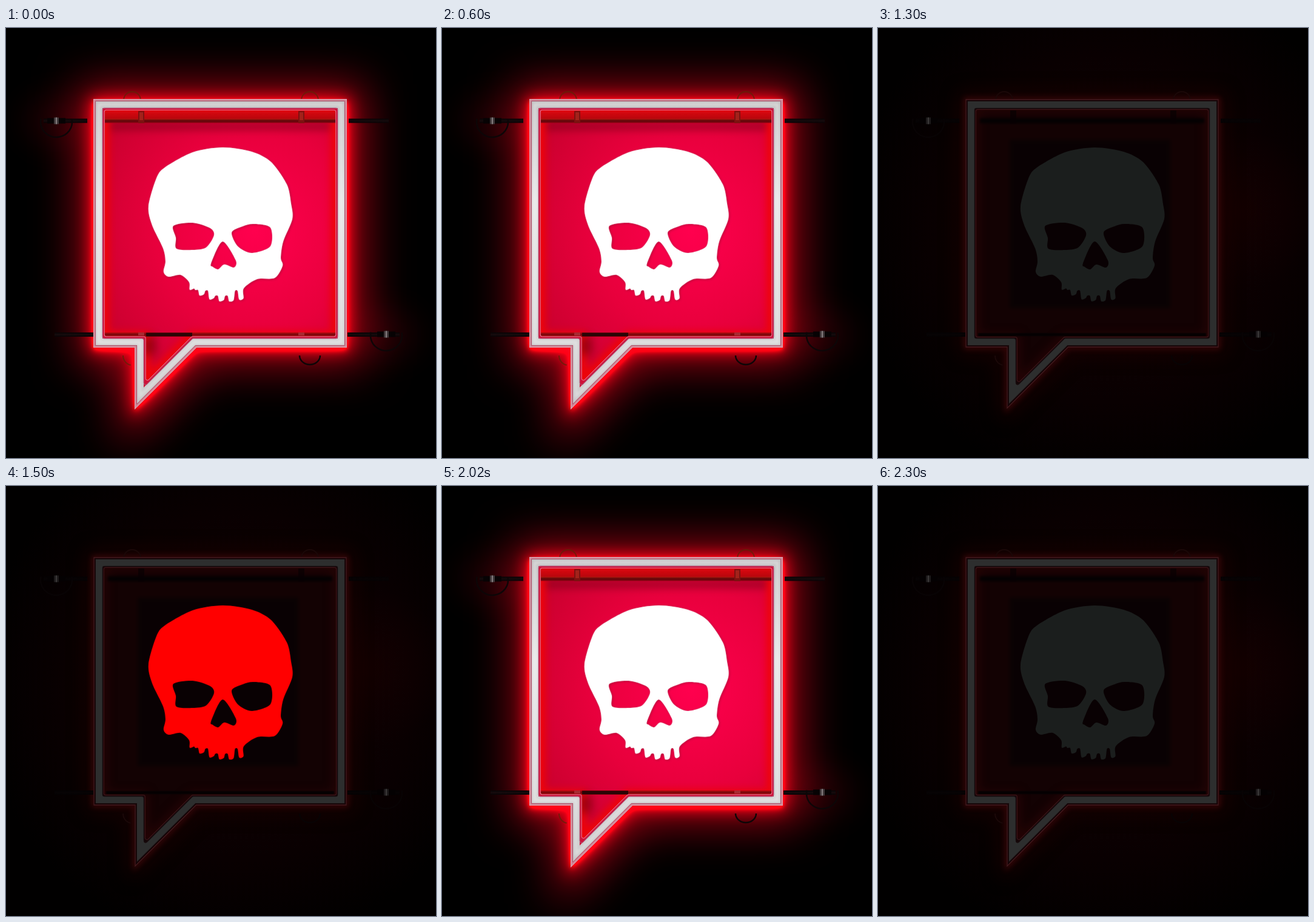
An HTML page with a canvas that plays this animation: 709x709 px, repeating every 2500 ms.

```html
<!DOCTYPE html>
<html lang="en">
<head>
<meta charset="utf-8">
<title>Neon skull sign</title>
<style>
html, body { margin: 0; width: 100%; height: 100%; overflow: hidden; background: #000; }
canvas { display: block; width: 100%; height: 100%; }
</style>
</head>
<body>
<canvas id="stage" width="709" height="709"></canvas>
<script>
const SIZE = 709, FAR = 3000, LOOP = 2500;

// Speech bubble outline, moved inwards by d
function bubble(d, r = 0) {
  const l = 144 + d, t = 117 + d, e = 562 - d, b = 527 - d;
  const x = 212 + d, sum = 841 - d * Math.SQRT2;
  const pts = [[l, t], [e, t], [e, b], [sum - b, b], [x, sum - x], [x, b], [l, b]];
  const p = new Path2D();
  p.moveTo((l + e) / 2, t);
  for (let i = 1; i <= pts.length; i++) {
    const a = pts[i % 7], n = pts[(i + 1) % 7];
    p.arcTo(a[0], a[1], n[0], n[1], r);
  }
  p.closePath();
  return p;
}

function ring(a, b) {
  const p = new Path2D(bubble(a));
  p.addPath(bubble(b, 3));
  return p;
}

// Smooth closed curve through a few points
function addCurve(p, pts) {
  const at = i => pts[(i + pts.length) % pts.length];
  p.moveTo(...at(0));
  pts.forEach((b, i) => {
    const a = at(i - 1), c = at(i + 1), d = at(i + 2);
    p.bezierCurveTo(b[0] + (c[0] - a[0]) / 7, b[1] + (c[1] - a[1]) / 7,
      c[0] - (d[0] - b[0]) / 7, c[1] - (d[1] - b[1]) / 7, c[0], c[1]);
  });
  p.closePath();
}

// Six evenly spaced teeth along a parabola, from right to left
function teeth() {
  const pts = [];
  for (let i = 0; i < 6; i++) {
    const x = 388 - 16.3 * i, y = 451 - ((x - 364) / 13) ** 2;
    const gap = y - (i % 3 ? 9 : 14);
    pts.push([x + 3.5, y - 2], [x - 3.5, y]);
    if (i < 5) pts.push([x - 6, gap], [x - 10.5, gap]);
  }
  return pts;
}

function makeSkull() {
  const right = [[357, 197], [405, 204], [437, 221], [463, 258], [470, 290], [472, 315],
    [457, 352], [453, 379], [456, 392], [443, 412], [414, 414], [392, 429]];
  const left = [[302, 419], [288, 407], [268, 410], [260, 402], [263, 385], [259, 363],
    [241, 325], [235, 294], [248, 248], [262, 230], [308, 205]];
  const leftEye = [[276, 326], [308, 321], [337, 330], [343, 342], [330, 362], [308, 366],
    [281, 364], [280, 346]];
  const rightEye = [[372, 337], [390, 327], [408, 323], [436, 329], [436, 360], [405, 371],
    [382, 360]];
  const nose = [[357, 352], [338, 388], [341, 394], [350, 398], [360, 390], [376, 395],
    [379, 383]];
  const p = new Path2D();
  [[...right, ...teeth(), ...left], leftEye, rightEye, nose].forEach(c => addCurve(p, c));
  return p;
}

// Soft blurred copy of a path; width > 0 blurs its stroke
function soft(g, path, color, sigma, width = 0, dx = 0, dy = 0) {
  g.save();
  g.shadowColor = color;
  g.shadowBlur = sigma * 2;
  g.shadowOffsetX = FAR + dx;
  g.shadowOffsetY = dy;
  g.translate(-FAR, 0);
  g.lineWidth = width;
  g.fillStyle = g.strokeStyle = '#000';
  if (width) g.stroke(path); else g.fill(path, 'evenodd');
  g.restore();
}

function line(g, path, color, width = 1) {
  g.strokeStyle = color;
  g.lineWidth = width;
  g.stroke(path);
}

function fill(g, path, color) {
  g.fillStyle = color;
  g.fill(path, 'evenodd');
}

function box(g, x, y, w, h, color) {
  g.fillStyle = color;
  g.fillRect(x, y, w, h);
}

function rect(x, y, w, h) {
  const p = new Path2D();
  p.rect(x, y, w, h);
  return p;
}

function arc(x, y, rx, ry, from, to) {
  const p = new Path2D();
  p.ellipse(x, y, rx, ry, 0, from * Math.PI, to * Math.PI);
  return p;
}

function ramp(f, colors) {
  colors.forEach((c, i) => f.addColorStop(i / (colors.length - 1), c));
  return f;
}
const radial = (g, x, y, r, ...colors) => ramp(g.createRadialGradient(x, y, 0, x, y, r), colors);
const vertical = (g, y0, y1, ...colors) => ramp(g.createLinearGradient(0, y0, 0, y1), colors);

const plugs = [[83, 153], [627, 505]], hooks = [208, 501], clamps = [218, 482];

// Rods, wires and hooks behind the bubble
function hardware(g, c) {
  const rod = (x, y, w) => box(g, x, y, w, 7, vertical(g, y, y + 7, c.rod, c.rodTop, c.rod));
  rod(62, 149.5, 72);
  rod(565, 149.5, 66);
  rod(80, 502, 67);
  rod(563, 502, 86);
  for (const [x, y] of plugs) {
    line(g, arc(x, y + 2, 26, 25, -.06, 1.07), c.wire, 2.5);
    box(g, x - 15, y - 4.5, 30, 9, c.rod);
    box(g, x - 4, y - 5.5, 8, 11, c.clip);
    box(g, x - 1, y - 5.5, 2, 11, c.clipLight);
  }
  for (const x of hooks) line(g, arc(x, 119, 14, 14, 1, 2), c.hook, 2);
  line(g, arc(208, 540, 15, 16, .55, 1), c.hook, 2);
  line(g, arc(501, 540, 17, 15, 0, 1), c.wire, 2.5);
}

function makeLit() {
  const [cv, g] = layer();
  box(g, 0, 0, SIZE, SIZE, '#000');
  g.globalCompositeOperation = 'lighter';
  soft(g, bubble(-26), 'rgb(150,0,17)', 36, 0, 3, 2);
  soft(g, bubble(-6), 'rgb(150,0,12)', 13, 0, 0, 2);
  soft(g, bubble(0), 'rgb(170,8,4)', 5, 0, 0, 4);
  for (const [x, y] of plugs) soft(g, arc(x, y, 55, 45, 0, 2), 'rgb(22,0,3)', 24);
  g.globalCompositeOperation = 'source-over';
  hardware(g, { rod: '#070304', rodTop: '#160b0d', wire: '#0d0607', clip: '#40383a',
    clipLight: '#857d7f', hook: 'rgba(100,34,8,.8)' });

  g.save();
  g.clip(bubble(14));
  box(g, 144, 117, 418, 520, radial(g, 410, 335, 330, '#ff004e', '#e8003c', '#c0002a'));
  soft(g, rect(165, 156, 380, 12), 'rgba(110,0,18,.55)', 7);
  // Warm light spilling in from the tube
  soft(g, bubble(18), 'rgba(238,4,8,.95)', 6, 18);
  box(g, 160, 132, 388, 18, vertical(g, 132, 150, '#f20a12', '#cf070e', '#b8060d'));
  box(g, 163, 149.5, 382, 7, vertical(g, 149, 157, '#c01a10', '#5c070a', '#8c0410'));
  for (const x of clamps) {
    box(g, x, 137, 10, 20, '#7c1210');
    box(g, x + 2, 139, 6, 13, '#a3221a');
  }
  box(g, 163, 502, 382, 7, vertical(g, 502, 509, '#b80b10', '#74070a', '#c0080e'));
  soft(g, rect(228, 509, 18, 30), 'rgba(90,0,8,.6)', 8);
  box(g, 231, 502.5, 76, 6, '#2a0506');
  for (const x of clamps) box(g, x, 502, 10, 5, '#a82a32');
  g.restore();

  // Glass rim, bright core, then the inner rim
  fill(g, ring(0, 4), '#cf8494');
  fill(g, ring(4, 15), vertical(g, 117, 629, '#c4c3c4', '#e6e5e6', '#dcdbdc', '#c8c7c8'));
  fill(g, ring(15, 18), '#cf1238');
  g.save();
  g.clip(ring(4, 15), 'evenodd');
  soft(g, bubble(9), 'rgba(255,255,255,.35)', 2, 4);
  g.restore();
  line(g, bubble(.6), '#d9a3af', 1.2);
  line(g, bubble(3.6), '#a5546c');
  line(g, bubble(15.2, 3), '#b24a70', 1.2);
  line(g, bubble(18.2, 3), '#e5718f', 1.1);

  soft(g, skull, 'rgba(110,0,26,.55)', 2, 0, 1, 1);
  soft(g, skull, 'rgba(255,220,230,.8)', 1);
  fill(g, skull, '#fff');
  return cv;
}

function makeDark(red) {
  const [cv, g] = layer();
  box(g, 0, 0, SIZE, SIZE, radial(g, 385, 330, 430, '#110103', '#0e0102', '#090001', '#010000'));
  box(g, 0, 0, SIZE, SIZE, radial(g, 600, 300, 130, 'rgba(24,0,0,.6)', 'rgba(24,0,0,0)'));
  soft(g, bubble(0), 'rgba(50,4,6,.55)', 16, 14);
  soft(g, bubble(1), 'rgba(85,12,14,.6)', 5, 7);
  hardware(g, { rod: '#040102', rodTop: '#070304', wire: '#080304', clip: '#1d1a1b',
    clipLight: '#3b3939', hook: '#1b0808' });

  g.save();
  g.clip(bubble(16));
  box(g, 144, 117, 418, 520, '#130203');
  soft(g, bubble(16), 'rgba(48,5,7,.7)', 8, 12);
  soft(g, rect(217, 184, 265, 278), '#090103', 3);
  soft(g, rect(168, 149, 370, 8), '#030001', 2);
  soft(g, rect(165, 503, 376, 5), '#040001', 1);
  for (const x of clamps) box(g, x, 136, 10, 22, 'rgba(8,1,2,.7)');
  g.restore();

  fill(g, ring(0, 18), '#140507');
  fill(g, ring(4, 15), '#2d2e2e');
  line(g, bubble(1), '#47191d', 1.3);
  line(g, bubble(3.4), '#1b0a0c');
  line(g, bubble(15.5, 3), '#170a0c', 1.5);
  line(g, bubble(17.3, 3), '#3f1418', 1.2);

  if (red) soft(g, skull, 'rgba(120,0,0,.8)', 1);
  fill(g, skull, red ? '#ff0000' : '#1b1e1d');
  return cv;
}

function layer() {
  const cv = document.createElement('canvas');
  cv.width = cv.height = SIZE;
  return [cv, cv.getContext('2d')];
}

const skull = makeSkull();
const view = document.getElementById('stage').getContext('2d');
const lit = makeLit(), off = makeDark(false), warm = makeDark(true);

// Bright, out, a short warm-up, bright again, out
function stateAt(t) {
  if (t < 1000) return lit;
  if (t < 1500) return off;
  if (t < 1600) return warm;
  return t < 2300 ? lit : off;
}

function draw() {
  view.drawImage(stateAt(performance.now() % LOOP), 0, 0);
  requestAnimationFrame(draw);
}
draw();
</script>
</body>
</html>
```
